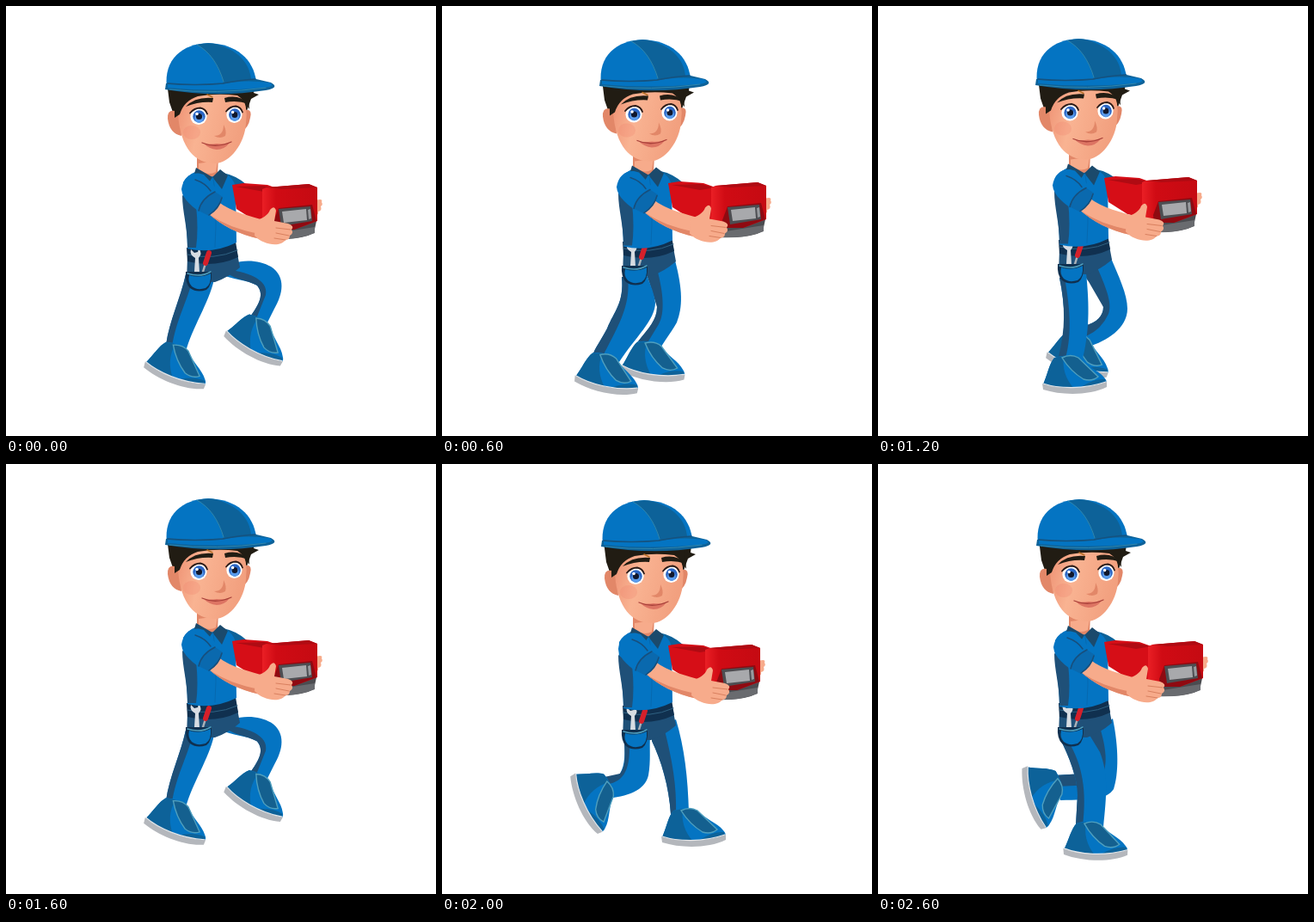
Write an HTML page without scripts that moves like this. It is 500 px wide and 500 px high and loops after 2.8 s.

```html
<!DOCTYPE html>
<html lang="en">
<head>
<meta charset="utf-8">
<title>Walking repairman</title>
<style>
  html, body { margin: 0; width: 100%; height: 100%; overflow: hidden; background: #fff; }
  svg { display: block; width: 100vw; height: 100vh; }
  .blue { fill: #0474c2; }
  .mid { fill: #0d6299; }
  .shade { fill: #1f5078; }
  .navy { fill: #10304f; }
  .skin { fill: #f7ab8b; }
  .tan { fill: #e28768; }
  .hair { fill: #211c13; }
  .line { fill: none; stroke-linecap: round; stroke-linejoin: round; }
</style>
</head>
<body>
<svg viewBox="0 0 500 500">
  <defs>
    <linearGradient id="face" x1="0" x2="1" y1="0" y2=".25">
      <stop offset="0" stop-color="#ee9173"/>
      <stop offset=".4" stop-color="#f9b392"/>
      <stop offset="1" stop-color="#f2a07f"/>
    </linearGradient>
    <linearGradient id="red" x1="0" x2="1">
      <stop offset="0" stop-color="#ea1f25"/>
      <stop offset=".25" stop-color="#d00b14"/>
      <stop offset="1" stop-color="#c50a12"/>
    </linearGradient>

    <!-- Origin at the heel, toe to the right -->
    <g id="shoe">
      <path class="blue" d="M-2-6C3-17 5-30 11-37Q25-42 39-37C48-27 62-23 69-14Q73-10 71-7C45 3 15 1-2-6Z"/>
      <path class="mid" d="M-2-6C3-17 5-30 11-37L22-39Q19-18 34-1Q13 0-2-6ZM42-3Q57-13 70-12L71-7Q56-2 42-1Z"/>
      <path d="M20-37Q30-42 39-37L62-15Q55-9 45-12Q30-21 20-37Z" fill="#14608f" stroke="#4f9fbe" stroke-width="1.4"/>
      <path d="M-3-7C16-1 45 0 72-9V-3C52 7 20 7-2 0Z" fill="#b4b7bc"/>
      <path class="line" d="M-2-7C16-1 45 0 71-9" stroke="#e2e6ea" stroke-width="1.2"/>
    </g>

    <g id="eye">
      <ellipse rx="9.6" ry="9.4" fill="#fff"/>
      <circle cx=".5" r="7.2" fill="#2b66c4"/>
      <circle cx=".5" cy="2" r="5.2" fill="#5a9cec"/>
      <circle cx=".5" r="3.6" fill="#10172c"/>
      <circle cx="-2" cy="-3" r="1.8" fill="#fff"/>
      <path class="line" d="M-10-4Q-5-10 2-10Q8-9 10-3" stroke="#2a1a17" stroke-width="1.8"/>
    </g>

    <!-- Each step: far leg and shoe, then near leg and shoe -->
    <g id="push">
      <path class="blue" d="M250 312C262 292 292 294 308 303C326 315 322 335 312 352L302 372L282 364C296 345 300 335 292 325C280 318 262 318 250 312Z"/>
      <path class="shade" d="M252 306C280 308 306 318 302 336L290 366L282 364C296 345 300 335 292 325C280 318 262 318 252 306Z"/>
      <use href="#shoe" transform="translate(255 385) rotate(30)"/>
      <path class="blue" d="M209 312C203 340 190 365 186 394L209 402C216 375 236 345 242 318Z"/>
      <path class="shade" d="M209 312C203 340 190 365 186 394L193 396C198 365 210 345 217 318Z"/>
      <use href="#shoe" transform="translate(162 421) rotate(22)"/>
    </g>
    <g id="strike">
      <path class="blue" d="M240 318L272 298C280 330 300 365 322 392L310 405C285 385 262 345 248 322Z"/>
      <path class="shade" d="M240 318L254 312C265 345 290 380 314 401L310 405C285 385 262 345 248 322Z"/>
      <use href="#shoe" transform="translate(326 440) rotate(-45)"/>
      <path d="M320 431Q324 443 334 441Q360 428 375 402Q375 390 368 389Q350 395 344 408Q335 420 320 431Z" fill="#b3b5ba"/>
      <path class="blue" d="M211 316C210 340 207 352 200 362C190 375 180 378 164 384L182 406C205 398 222 388 232 365C238 350 241 335 242 316Z"/>
      <path class="shade" d="M211 316C210 340 207 352 200 362C190 375 180 378 164 384L168 390C188 382 206 374 212 355L217 316Z"/>
      <use href="#shoe" transform="translate(133 405) rotate(36)"/>
    </g>
    <g id="lift">
      <path class="blue" d="M244 312L272 297C282 330 286 365 287 405L266 407C264 375 255 345 244 322Z"/>
      <path class="shade" d="M244 312L258 306C268 345 273 375 272 406L266 407C264 375 255 345 244 322Z"/>
      <use href="#shoe" transform="translate(258 440)"/>
      <path class="blue" d="M212 320C213 335 213 350 207 360C200 365 193 364 184 365L190 389C215 387 236 380 240 362C243 345 241 330 242 316Z"/>
      <path class="shade" d="M212 325C213 345 213 352 207 360L184 365L188 373C210 371 219 358 218 325Z"/>
      <use href="#shoe" transform="translate(150 365) rotate(67)"/>
    </g>
    <g id="swing">
      <path class="blue" d="M238 312L271 296C280 330 280 350 273 368C265 382 258 390 254 398L228 390C240 375 250 365 250 350C250 335 245 325 240 318Z"/>
      <path class="shade" d="M238 312L250 306C258 335 259 358 252 370L238 393L228 390C240 375 250 365 250 350Z"/>
      <use href="#shoe" transform="translate(210 425) rotate(10)"/>
      <path class="blue" d="M209 315C212 345 200 355 192 375C185 388 178 398 175 406L206 414C225 385 248 365 248 345C246 330 240 320 238 312Z"/>
      <path class="shade" d="M209 315C212 345 200 355 192 375C185 388 178 398 175 406L186 409C203 375 220 350 216 315Z"/>
      <use href="#shoe" transform="translate(156 437) rotate(13)"/>
    </g>
    <g id="reach">
      <path class="blue" d="M242 312L272 298C284 330 282 360 268 376C252 388 238 390 226 392L212 372C235 368 246 362 248 350Z"/>
      <path class="shade" d="M242 312L256 305C262 335 264 362 252 374L219 382L212 372C235 368 246 362 248 350Z"/>
      <use href="#shoe" transform="translate(180 395) rotate(42)"/>
      <path class="blue" d="M211 318C214 345 212 360 208 380L202 414L231 419C242 385 250 365 248 345L240 313Z"/>
      <path class="shade" d="M211 318C214 345 212 360 208 380L202 414L211 416C220 380 224 350 218 318Z"/>
      <use href="#shoe" transform="translate(186 450) rotate(7)"/>
    </g>
    <g id="stand">
      <path class="blue" d="M246 316L273 296C280 330 280 360 274 378C266 390 250 390 212 391L205 362L240 360Z"/>
      <path class="shade" d="M246 316L258 306C268 340 268 362 250 373L208 375L205 362L240 360Z"/>
      <use href="#shoe" transform="translate(168 356) rotate(75)"/>
      <path class="blue" d="M212 320C222 340 232 365 232 385L230 420L262 422C266 385 268 360 258 335L244 312Z"/>
      <path class="shade" d="M212 320C222 340 232 365 232 385L230 420L238 421C243 380 238 350 221 322Z"/>
      <use href="#shoe" transform="translate(218 454) rotate(3)"/>
    </g>
    <g id="pass">
      <path class="blue" d="M240 312L270 291C280 315 290 335 290 352C290 375 265 390 245 396L240 372C255 368 262 360 262 350C260 335 250 325 243 318Z"/>
      <path class="shade" d="M240 312L254 302C264 325 273 345 268 358Q260 376 242 384L240 372C255 368 262 360 262 350Z"/>
      <use href="#shoe" transform="translate(197 410) rotate(20)"/>
      <path class="blue" d="M211 316C218 350 218 375 212 405L237 414C246 380 246 350 242 310Z"/>
      <path class="shade" d="M211 316C218 350 218 375 210 408L218 410C226 380 223 350 217 316Z"/>
      <use href="#shoe" transform="translate(194 446)"/>
    </g>
    <g id="rise">
      <path class="blue" d="M246 312L272 295C295 305 306 325 304 340C298 362 285 380 276 389L252 377C270 360 278 345 272 335C262 325 252 320 246 312Z"/>
      <path class="shade" d="M246 312L258 304C278 318 288 335 281 348L262 382L252 377C270 360 278 345 272 335Z"/>
      <use href="#shoe" transform="translate(225 397) rotate(25)"/>
      <path class="blue" d="M210 315C212 345 202 375 198 402L224 409C234 378 244 345 243 314Z"/>
      <path class="shade" d="M210 315C212 345 202 375 198 402L206 405C213 375 220 345 217 316Z"/>
      <use href="#shoe" transform="translate(178 432) rotate(11)"/>
    </g>
  </defs>

  <g id="legs">
    <use href="#push">
      <animate attributeName="href" calcMode="discrete" dur="2.8s" repeatCount="indefinite"
        values="#push;#strike;#lift;#swing;#reach;#stand;#pass;#rise;#push;#strike;#lift;#swing;#reach;#stand"/>
    </use>
    <animateTransform attributeName="transform" type="translate" calcMode="discrete" dur="2.8s" repeatCount="indefinite"
      values="0 0;0 0;-2 -1;0 0;0 0;-1 -1;0 0;0 0;0 -2.5;-1 -2;0 0;3 2;2 2;0 0"/>
  </g>

  <g id="hips">
    <path class="shade" d="M211 292Q240 300 269 288L272 304Q258 316 243 321L210 320Z"/>
    <path class="navy" d="M210 281Q240 284 267 274L270 292Q242 305 211 297Z"/>
    <path class="line" d="M211 289Q242 296 269 284" stroke="#2f6283"/>
    <path d="M219 309L220 293Q213 289 215 283L219 287L223 286L224 282Q229 288 224 293L225 310Z" fill="#d7dce2"/>
    <path class="line" d="M229 309L233 296" stroke="#aab0b8" stroke-width="2.5"/>
    <path class="line" d="M232 299L236 287" stroke="#d5202a" stroke-width="6"/>
    <path class="navy" d="M209 309L239 309Q240 325 233 330Q222 334 214 328Q208 322 209 309Z"/>
    <path class="blue" d="M213 313Q226 317 238 311Q239 324 232 328Q222 331 216 326Q211 321 213 313Z"/>
    <path class="line" d="M211 311Q226 316 238 309" stroke="#4f9fbe" stroke-width="1.5"/>
    <animateTransform attributeName="transform" type="translate" calcMode="discrete" dur="2.8s" repeatCount="indefinite"
      values="0 0;0 -4;0 -4;0 -7;0 -6;0 -7;0 -9;0 -5;0 -3;0 -2;0 0;0 -1;0 -2;0 -3"/>
  </g>

  <g id="torso">
    <path class="mid" d="M252 194Q268 197 280 208L264 222Z"/>
    <path class="blue" d="M206 205Q210 197 222 192L253 194Q264 199 267 210L268 275Q240 289 211 282C211 250 204 230 206 205Z"/>
    <path class="shade" d="M205 220L221 232Q224 260 221 281L211 281C211 255 205 240 205 220Z"/>
    <path class="tan" d="M222 176H247L246 195Q236 204 222 192Z"/>
    <path class="skin" d="M224 183L246 180L244 193Q234 198 224 190Z"/>
    <path d="M221 188L240 199L233 210L218 198ZM240 199L249 190L258 197L251 213Z" fill="#1b4a6c"/>
    <path class="line" d="M241 200Q246 230 243 280" stroke="#0669b0"/>
    <animateTransform attributeName="transform" type="translate" calcMode="discrete" dur="2.8s" repeatCount="indefinite"
      values="0 0;0 -2;0 -1;0 -2.5;0 -3;0 -4;0 -4.5;0 -4;0 -3;0 -1;0 2;0 1;0 0;0 0"/>
  </g>

  <g id="toolbox">
    <path d="M263 208L276 206L304 208L318 213V256L290 250L268 236Z" fill="#d60e17"/>
    <path d="M267 210L300 209L318 213L300 216Z" fill="#b00b13"/>
    <g>
      <path class="skin" d="M360 226Q369 223 367 228Q369 231 366 233Q368 238 363 239Q364 243 360 243Z"/>
      <path d="M298 254L335 252L361 250L358 264Q340 274 298 269Z" fill="#4b4c50"/>
      <path d="M302 266L359 257V264Q338 273 304 271Z" fill="#696b6f"/>
      <path d="M298 213L303 211L352 207L362 211V250L346 256L335 260L298 259Z" fill="url(#red)"/>
      <path d="M303 211L352 207L362 211L320 213Z" fill="#b00b13"/>
      <path d="M311 251L317 235L356 231L361 250L335 260H312Z" fill="#8f0a11"/>
      <path d="M317 236L354 233L356 250L320 256Z" fill="#4d4e52"/>
      <path d="M321 239L349 236L350 249L323 252Z" fill="#a8a9ac"/>
      <path d="M351 237L354 236L355 247L352 248Z" fill="#989a9e"/>
      <animateTransform attributeName="transform" type="translate" calcMode="discrete" dur="2.8s" repeatCount="indefinite"
        values="0 0;9 0;13 0;15 0;16 0;16 0;9 0;5 0;0 0;8 0;8 0;18 0;17 0;16 0"/>
    </g>
    <animateTransform attributeName="transform" type="translate" calcMode="discrete" dur="2.8s" repeatCount="indefinite"
      values="0 0;0 -4;0 -2;0 -2;0 -4;0 -6;0 -8;0 -5;0 -2;0 -2;0 3;0 0;0 0;0 -1"/>
  </g>

  <g id="upper">
    <path class="skin" d="M246 227C262 240 285 244 302 250L296 271C270 266 250 254 236 242Z"/>
    <path class="tan" d="M236 242C252 253 272 261 295 265L296 271C270 266 250 254 236 242Z"/>
    <path class="skin" d="M290 250C298 247 305 243 307 237Q312 231 314 238L312 250L328 253Q336 256 332 260Q335 264 330 267Q330 272 325 272C319 281 299 278 289 267Z"/>
    <path class="line" d="M314 258L331 260M314 264L329 267M312 270L325 272" stroke="#d9805f"/>
    <path class="blue" d="M204 213C206 198 218 191 230 196L252 220L231 243C218 235 205 225 204 213Z"/>
    <path d="M224 238Q227 224 243 216L252 222Q249 235 236 244Z" fill="#0a69ae"/>
    <path class="line" d="M224 238Q227 224 243 216M220 202Q232 206 238 215M236 243Q248 235 251 223" stroke="#174f7d" stroke-width="1.5"/>

    <path class="hair" d="M187 88L290 84L288 101L294 103L285 108L280 122L197 132L190 112Z"/>
    <path class="tan" d="M203 124Q187 117 188 131Q190 148 204 151ZM277 121Q287 119 284 130Q282 142 273 147Z"/>
    <path d="M200 126Q203 111 216 104L272 100Q282 116 279 136C278 160 260 183 243 183C220 183 203 166 200 126Z" fill="url(#face)"/>
    <path class="hair" d="M196 99L281 96L283 120Q277 109 269 104Q245 101 223 105Q207 110 202 126L196 130Z"/>
    <path class="line" d="M234 103L240 106" stroke="#b56e26" stroke-width="1.5"/>
    <ellipse cx="216" cy="147" rx="10" ry="8" fill="#f0806b" opacity=".25"/>
    <use href="#eye" x="224" y="128.5"/>
    <use href="#eye" transform="translate(265.5 126.5) scale(.95 1)"/>
    <path class="hair" d="M209 117Q220 105 241 107L240 112Q224 111 209 117ZM254 107Q271 102 282 114Q269 109 255 112Z"/>
    <path class="tan" d="M253 138Q257 146 255 151Q249 155 242 151Q253 151 253 138Z"/>
    <path d="M230 160Q237 161 245 160Q253 161 260 159Q254 167 245 167Q236 166 230 160Z" fill="#dd7463"/>
    <path class="line" d="M228 159Q244 166 262 158" stroke="#a9413a" stroke-width="1.3"/>
    <animateTransform attributeName="transform" type="translate" calcMode="discrete" dur="2.8s" repeatCount="indefinite"
      values="0 0;0 -2;0 -1;-1 -2.5;-1 -3;-1 -4;-1 -4.5;0 -4;0 -3;0 -1;1 2;0 1;0 0;0 0"/>
  </g>

  <g id="cap">
    <path class="blue" d="M187 95C183 62 205 44 235 43C268 44 288 62 291 88Q240 97 187 95Z"/>
    <path class="mid" d="M222 45Q235 42 243 44C268 50 284 66 285 86Q265 91 253 89C247 68 237 53 222 45Z"/>
    <path class="line" d="M222 45C237 53 247 68 253 88" stroke="#2e86ae"/>
    <path class="mid" d="M186 90Q235 94 291 85L308 89Q319 95 302 98Q245 107 185 97Z"/>
    <path class="blue" d="M188 91Q220 93 250 91Q276 85 306 89Q315 93 300 95Q240 100 188 95Z"/>
    <path class="line" d="M188 90Q220 93 252 90Q272 86 290 85" stroke="#15527f" stroke-width="1.5"/>
    <path class="line" d="M190 97Q245 103 302 95" stroke="#2e86ae"/>
    <animateTransform attributeName="transform" type="translate" calcMode="discrete" dur="2.8s" repeatCount="indefinite"
      values="0 0;0 1;-1 -4;-2 -4;-2 -5;-2 -5;-2 -5;0 -3;0 -3;0 -1;0 -1;0 -3;-1 -3;-1 -2"/>
  </g>
</svg>
</body>
</html>
```
